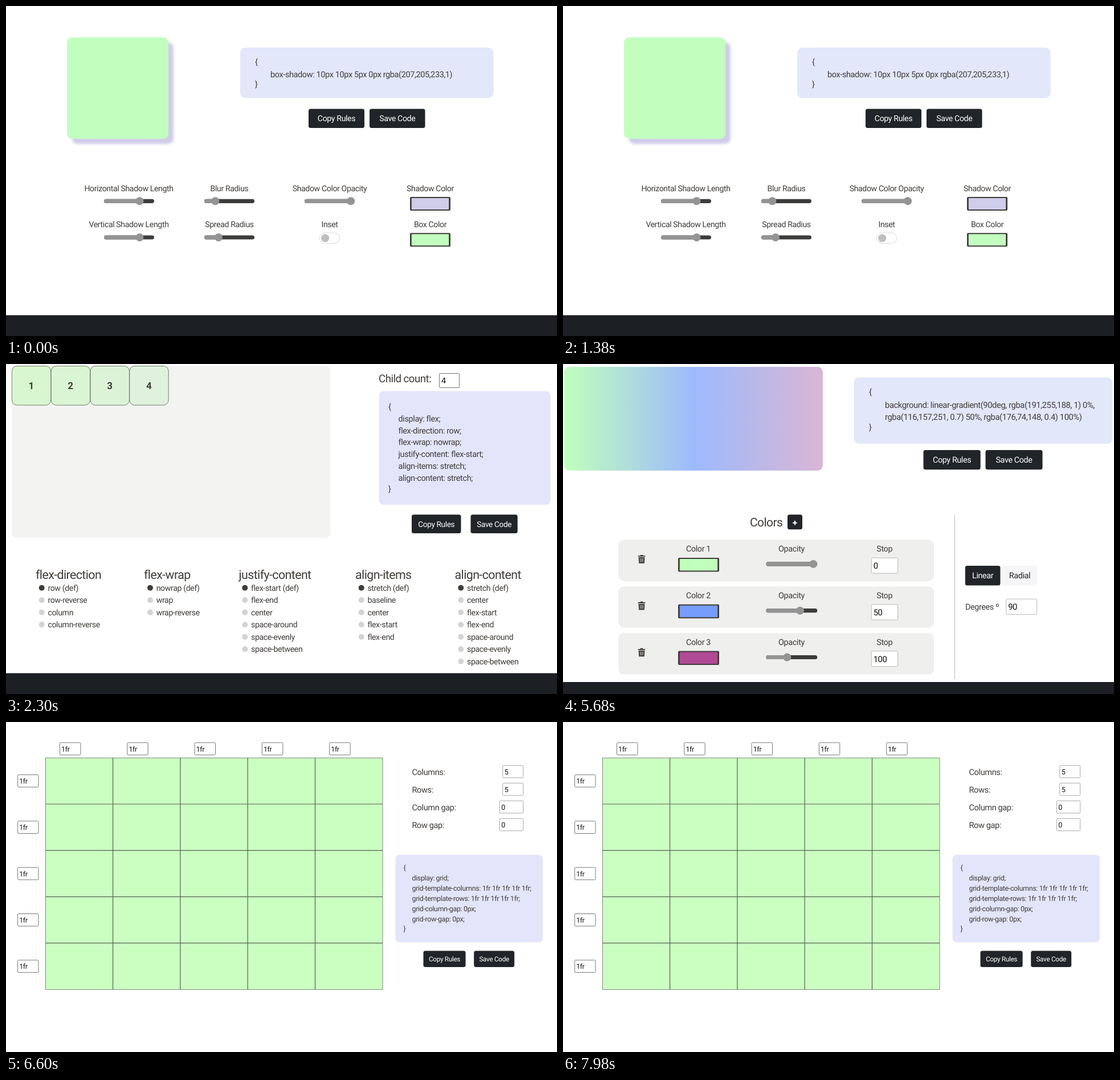
Recreate the animation shown at these times as an HTML page. Size 967 by 579 pixels, loop 8.9 s.

```html
<!DOCTYPE html>
<html lang="en">
<head>
<meta charset="utf-8">
<title>CSS generators</title>
<style>
  html, body { margin: 0; width: 100%; height: 100%; overflow: hidden; background: #fff; }
  svg { display: block; width: 100%; height: 100%; }
  text {
    font-family: Roboto, "Open Sans", sans-serif;
    letter-spacing: -.028em;
    text-rendering: geometricPrecision;
    white-space: pre;
  }
</style>
</head>
<body>
<svg id="stage" viewBox="0 0 967 579">
  <defs>
    <filter id="soft" x="-10%" y="-10%" width="120%" height="120%">
      <feGaussianBlur stdDeviation="2.2"/>
    </filter>
    <linearGradient id="blend">
      <stop offset="0" stop-color="rgb(192,255,189)"/>
      <stop offset=".5" stop-color="rgb(158,186,252)"/>
      <stop offset="1" stop-color="rgb(217,182,212)"/>
    </linearGradient>
  </defs>
</svg>
<script>
const INK = '#403d39', DARK = '#212529', FOOT = '#1c1f24', GREY = '#949494', MINT = '#c2ffbf';
const stage = document.getElementById('stage');
let scene;

function add(tag, attrs, parent = scene) {
  const el = document.createElementNS('http://www.w3.org/2000/svg', tag);
  for (const key in attrs) el.setAttribute(key, attrs[key]);
  parent.append(el);
  return el;
}

// Boxes are given by their left, top, right and bottom edges.
const box = (l, t, r, b, fill, rx = 0, more = {}) =>
  add('rect', { x: l, y: t, width: r - l, height: b - t, rx, fill, ...more });
const dot = (cx, cy, r, fill) => add('circle', { cx, cy, r, fill });
const path = (d, more) => add('path', { d, fill: 'none', ...more });

const text = (str, x, y, size, more = {}) =>
  add('text', { x, y, 'font-size': size, fill: INK, ...more }).textContent = str;
const mid = (str, x, y, size, more) => text(str, x, y, size, { 'text-anchor': 'middle', ...more });

function button(str, l, t, r, b, size, dark = true) {
  box(l, t, r, b, dark ? DARK : '#f6f6f9', 3.5);
  mid(str, (l + r) / 2, (t + b) / 2 + size * .36, size, { fill: dark ? '#fff' : DARK });
}

function field(str, l, t, w, h, size, stroke = '#767676', pad = 3.5) {
  box(l, t, l + w, t + h, '#fff', 1.5, { stroke });
  text(str, l + pad, t + h / 2 + size * .37, size, { fill: '#111' });
}

function slider(l, r, y, thumb) {
  box(l, y - 3.6, r, y + 3.6, '#3d3c3b', 3.6);
  box(l, y - 3.6, thumb, y + 3.6, GREY, 3.6);
  dot(thumb, y, 7, GREY);
}

function swatch(l, t, r, b, color) {
  box(l, t, r, b, INK, 2);
  box(l + 2.8, t + 2, r - 2.8, b - 2, color, 1);
}

function code(lines, x, y, step, size) {
  lines.forEach((line, i) => text(line, x, y + i * step, size));
}

function braces(x, top, bottom, size) {
  text('{', x, top, size);
  text('}', x, bottom, size);
}

const footer = top => box(0, top, 967, 579, FOOT);

function shadowPage() {
  box(115.9, 63.9, 293.9, 241.9, '#cfcde9', 9, { filter: 'url(#soft)' });
  box(107, 55, 285, 233, MINT, 9);
  box(411, 73, 855.5, 161.5, '#e2e7fa', 9);
  braces(437, 103, 142, 14.5);
  text('box-shadow: 10px 10px 5px 0px rgba(207,205,233,1)', 464, 125, 14.54);
  button('Copy Rules', 531, 180.5, 629, 214, 14.2);
  button('Save Code', 638, 180.5, 735.5, 214, 14.2);

  const labels = [
    ['Horizontal Shadow Length', 215.5, 324.5], ['Blur Radius', 392, 324.5],
    ['Shadow Color Opacity', 568, 324.5], ['Shadow Color', 744.5, 324.5],
    ['Vertical Shadow Length', 215.5, 388], ['Spread Radius', 392, 388],
    ['Inset', 568, 388], ['Box Color', 744.5, 387.5]
  ];
  for (const [str, x, y] of labels) mid(str, x, y, 14.15);
  slider(172, 260, 342.3, 234.5);
  slider(348, 436, 342.3, 367.3);
  slider(524, 612, 342.3, 605);
  slider(172, 260, 406, 234.5);
  slider(348, 436, 406, 373);
  swatch(709, 335, 780, 359, '#cfcde9');
  swatch(709, 398.3, 780, 422.3, MINT);
  box(550.3, 398, 585.7, 416.6, '#fff', 9.3, { stroke: '#d9d9d9' });
  dot(560.2, 407.3, 7, '#bfbfbf');
  footer(542.5);
}

function flexPage() {
  box(10, 3, 569, 305, '#f3f4f2', 8);
  ['#d8f7d0', '#daf5d3', '#dcf3d8', '#def2dc'].forEach((fill, i) => {
    const x = 10.4 + i * 68.8;
    box(x, 3.5, x + 68.4, 72.2, fill, 9, { stroke: '#6b6e68', 'stroke-width': .9 });
    mid(i + 1, x + 33.8, 44, 17, { 'font-weight': 700 });
  });
  text('Child count:', 654, 32, 18.7);
  field('4', 760.5, 16.5, 35, 25, 14.5);
  box(654.5, 47.5, 955.5, 247, '#e3e5fa', 8);
  braces(671, 79.5, 224, 14.4);
  code(['display: flex;', 'flex-direction: row;', 'flex-wrap: nowrap;',
    'justify-content: flex-start;', 'align-items: stretch;', 'align-content: stretch;'],
    688.5, 101, 20.7, 14.55);
  button('Copy Rules', 712, 264.3, 798.5, 297, 13.7);
  button('Save Code', 815.5, 264.3, 897.8, 297, 13.7);

  const groups = [
    ['flex-direction', 52, 62.7, 'row (def)|row-reverse|column|column-reverse'],
    ['flex-wrap', 242, 253, 'nowrap (def)|wrap|wrap-reverse'],
    ['justify-content', 408.5, 419.3,
      'flex-start (def)|flex-end|center|space-around|space-evenly|space-between'],
    ['align-items', 613, 623.7, 'stretch (def)|baseline|center|flex-start|flex-end'],
    ['align-content', 787.5, 798.3,
      'stretch (def)|center|flex-start|flex-end|space-around|space-evenly|space-between']
  ];
  for (const [title, x, cx, options] of groups) {
    text(title, x, 376.5, 21.4);
    options.split('|').forEach((option, i) => {
      const y = 392.8 + i * 21.5;
      dot(cx, y, 5, i ? '#d3d3d3' : INK);
      text(option, cx + 10.7, y + 5, 14.2);
    });
  }
  footer(542.5);
}

function trash(x, y) {
  box(x - 6.3, y - 6, x + 6.3, y - 4.2, INK, .5);
  box(x - 2.4, y - 7.4, x + 2.4, y - 5, INK, .8);
  path(`M${x - 5.4} ${y - 3.2}h10.8l-.6 10.6h-9.6z`, { fill: INK });
  path(`M${x - 2.3} ${y - 1.2}v6.4M${x} ${y - 1.2}v6.4M${x + 2.3} ${y - 1.2}v6.4`,
    { stroke: '#efefee', 'stroke-width': .8 });
}

function gradientPage() {
  box(2, 5, 456, 187, 'url(#blend)', 9);
  box(510.5, 23.5, 964.3, 140, '#e2e7fa', 9);
  braces(537, 54, 116, 14.8);
  code(['background: linear-gradient(90deg, rgba(191,255,188, 1) 0%,',
    'rgba(116,157,251, 0.7) 50%, rgba(176,74,148, 0.4) 100%)'], 565, 76.5, 21.7, 14.77);
  button('Copy Rules', 632.5, 151, 732.7, 185.3, 14.4);
  button('Save Code', 741.5, 151, 841.5, 185.3, 14.4);
  text('Colors', 328, 284.7, 21);
  box(394, 264.3, 420, 290.3, DARK, 3.5);
  path('M403.3 278.8h7.4M407 275.1v7.4', { stroke: '#fff', 'stroke-width': 2 });

  const rows = [['#c0ffbc', 439.3, 0], ['#769dfb', 416, 50], ['#b04a94', 393.3, 100]];
  rows.forEach(([color, thumb, stop], i) => {
    const y = 308.5 + i * 81.8;
    box(97.3, y, 651, y + 72.5, '#efefee', 9);
    trash(138, y + 33.8);
    mid('Color ' + (i + 1), 237.5, y + 20.8, 14.4);
    mid('Opacity', 401, y + 20.8, 14.5);
    mid('Stop', 564.2, y + 20.8, 14.4);
    swatch(202, y + 31.5, 274, y + 56, color);
    slider(356.5, 446.3, y + 42.4, thumb);
    field(stop, 541.2, y + 31.7, 46.5, 27, 14.8, '#b8b8b8');
  });

  path('M687.4 264V553', { stroke: '#cccccc', 'stroke-width': 1.4 });
  button('Linear', 705.8, 354, 767.5, 388.5, 14.4);
  button('Radial', 770.5, 354, 832.3, 388.5, 14.4, false);
  text('Degrees º', 706, 431, 14.4);
  field('90', 777.7, 412.3, 54, 27, 14.8, '#b8b8b8');
  footer(558);
}

function gridPage() {
  const w = 118.3, h = 81.3;
  const unit = (x, y) => field('1fr', x, y, 36.4, 21.6, 12.4, '#777', 2.6);
  box(69.5, 63, 661, 469.4, '#cbffc2', 0, { stroke: '#7c8c76' });
  for (let i = 0; i < 5; i++) {
    if (i) path(`M${69.3 + i * w} 63V469.4M69.5 ${62.7 + i * h}H661`,
      { stroke: '#566052', 'stroke-width': 1.2 });
    unit(94.5 + i * w, 36.2);
    unit(20.6, 92.6 + i * h);
  }
  const rows = [['Columns:', 5, 871.7], ['Rows:', 5, 871.7],
    ['Column gap:', 0, 866.3], ['Row gap:', 0, 866.3]];
  rows.forEach(([label, value, x], i) => {
    const y = i * 31;
    text(label, 712.5, 92.5 + y, 14.6);
    field(value, x, 76.3 + y, 907.7 - x, 21.6, 12.6, '#a8a8a8', 3);
  });
  box(683.5, 233, 942, 386.5, '#e3e5fa', 7);
  braces(697.5, 260, 367, 12.5);
  code(['display: grid;', 'grid-template-columns: 1fr 1fr 1fr 1fr 1fr;',
    'grid-template-rows: 1fr 1fr 1fr 1fr 1fr;', 'grid-column-gap: 0px;',
    'grid-row-gap: 0px;'], 712.5, 278.3, 17.85, 12.48);
  button('Copy Rules', 732.5, 401.5, 806.6, 430, 11.8);
  button('Save Code', 821.2, 401.5, 892.2, 430, 11.8);
}

const LOOP = 8900;
const pages = [[0, shadowPage], [2300, flexPage], [4300, gradientPage], [6600, gridPage]];

pages.forEach(([, draw], n) => {
  scene = add('g', {}, stage);
  draw();
  const steps = pages.map(([at], i) =>
    ({ offset: at / LOOP, opacity: +(i === n), easing: 'step-end' }));
  steps.push({ offset: 1, opacity: steps.at(-1).opacity });
  const anim = scene.animate(steps, { duration: LOOP, iterations: Infinity });
  anim.startTime = 0;
});
</script>
</body>
</html>
```
